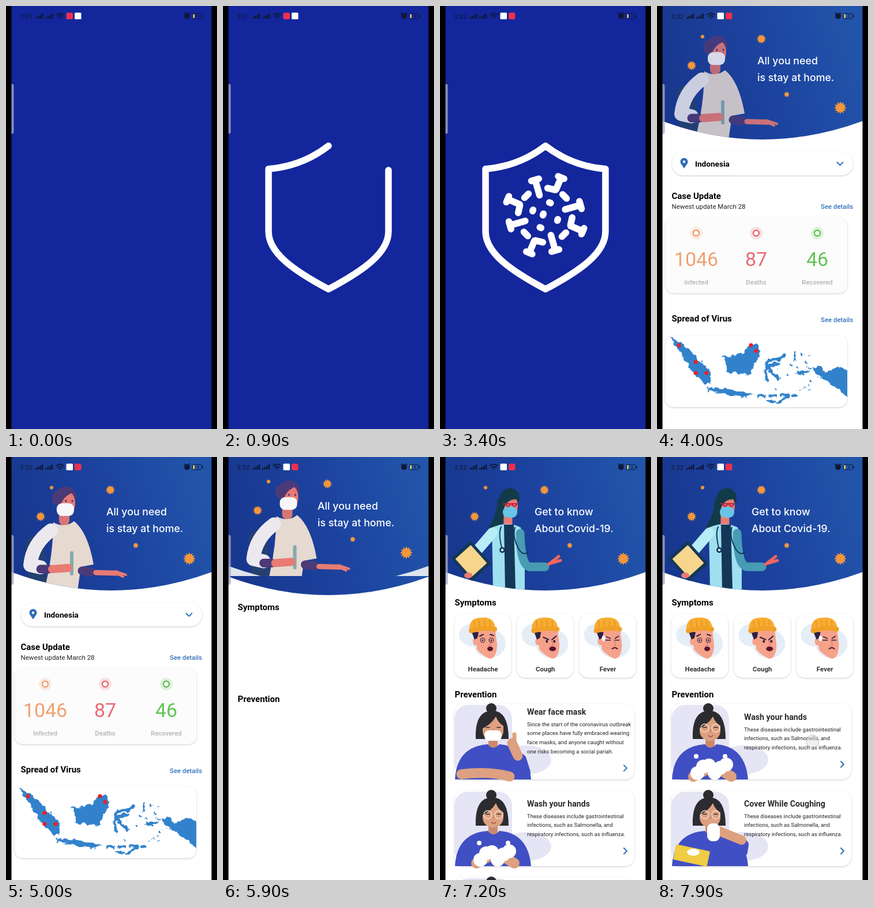
An HTML page for the animation above (8000 ms loop, 366 by 732 pixels).

```html
<!DOCTYPE html>
<html lang="en">
<head>
<meta charset="utf-8">
<title>Stay at home app</title>
<style>
html, body { margin: 0; width: 100%; height: 100%; overflow: hidden; background: #000; }
svg { display: block; width: 366px; height: 732px; font-family: Roboto, sans-serif; }
.round { fill: none; stroke-linecap: round; stroke-linejoin: round; }
.shadow { filter: drop-shadow(0 1px 1.5px #0003); }
</style>
</head>
<body>
<svg id="stage" viewBox="0 0 366 732" xmlns="http://www.w3.org/2000/svg"></svg>
<script>
const LOOP = 8000;
const clamp = v => Math.max(0, Math.min(1, v));
const ramp = (t, start, length) => clamp((t - start) / length);
const easeOut = p => 1 - (1 - p) ** 3;
const easeInOut = p => p * p * (3 - 2 * p);
const times = (n, make) => Array.from({ length: n }, (_, i) => make(i));
const repeat = (n, make) => times(n, make).join('');
let seed = 7;
const random = () => (seed = seed * 16807 % 2147483647) / 2147483647;

// Markup helpers
const text = (x, y, s, size, weight = 400, fill = '#111', more = '') =>
  `<text x="${x}" y="${y + size * .35}" font-size="${size}" font-weight="${weight}" fill="${fill}" ${more}>${s}</text>`;
const mid = 'text-anchor="middle"';
const shape = (d, fill, more = '') => `<path d="${d}" fill="${fill}" ${more}/>`;
const line = (d, color, width, more = '') =>
  `<path class="round" d="${d}" stroke="${color}" stroke-width="${width}" ${more}/>`;
const oval = (x, y, rx, ry, fill, more = '') =>
  `<ellipse cx="${x}" cy="${y}" rx="${rx}" ry="${ry}" fill="${fill}" ${more}/>`;
const box = (x, y, w, h, r, fill, more = '') =>
  `<rect x="${x}" y="${y}" width="${w}" height="${h}" rx="${r}" fill="${fill}" ${more}/>`;
const group = (id, inner, more = '') => `<g id="${id}" ${more}>${inner}</g>`;
const card = (x, y, w, h, r, fill = '#fff') => box(x, y, w, h, r, fill, 'class="shadow"');
const chevron = (x, y) => line(`M${x} ${y - 5}l5 5l-5 5`, '#316cb5', 2);

// Splash: a shield, and a virus with fourfold symmetry
const polar = (r, degrees) => {
  const a = degrees * Math.PI / 180;
  return [182.5 + r * Math.cos(a), 362 + r * Math.sin(a)];
};
const stroke = (r1, a1, r2, a2, start) => ({ from: polar(r1, a1), to: polar(r2, a2), start });
const arc = (r, a, half, start) => stroke(r, a + half, r, a - half, start);
const strokes = [arc(4, 200, 20, 1320)].concat(...times(4, i => {
  const turn = -90 * i, wave = easeOut(i / 3);
  const long = 1000 + 650 * wave, short = 1030 + 880 * wave;
  return [
    arc(47, 193 + turn, 8, 1050 + 50 * i), arc(47, 226 + turn, 6, 1050 + 50 * i),
    arc(23, 201 + turn, 3, 1320 + 40 * i),
    stroke(36, 164 + turn, 63, 164 + turn, long), arc(64, 164 + turn, 6, long + 40),
    stroke(48, 203 + turn, 70, 203 + turn, short), arc(71, 203 + turn, 4.5, short + 40)
  ];
}));
const shield = 'M183 242Q138 277 79 282V390C79 427 121 457 183 490C245 457 287 427 287 390V282Q228 277 183 242Z';
const splash = line(shield, '#fff', 11.5, 'id="shield" pathLength="100" stroke-dasharray="100"') +
  strokes.map(() => line('', '#fff', 11.5, 'data-part')).join('');

// Header
const curve = 'M9 0V199Q183 263 357 199V0Z';
const germ = ([x, y, r]) => `<polygon fill="#f3973d" points="${times(24, i => {
  const a = i * Math.PI / 12, q = i % 2 ? r * .72 : r * 1.1;
  return `${x + q * Math.cos(a)},${y + q * Math.sin(a)}`;
}).join(' ')}"/>`;
const germs = [[181, 57, 7.5], [79, 53, 3.5], [60, 103, 7.5], [225, 153, 4.5], [318, 176, 10]].map(germ).join('');
const slogan = (x, a, b) => `<g font-family="Inter, sans-serif">${
  text(x, 95, a, 17.8, 500, '#fff') + text(x, 124, b, 17.8, 500, '#fff')}</g>`;

const plum = '#4c3a78', coral = '#e87b72', teal = '#113b48', navy = '#143758';
const patient =
  line('M50 154L56 220', '#24406f', 32) +
  oval(88, 71, 8, 12, plum) + oval(104, 69, 18, 18, plum) +
  line('M101 92V110', '#d87573', 18) + oval(107, 80, 13, 20, coral) +
  shape('M88 78Q90 50 121 61Q103 63 95 82Z', plum) +
  oval(104, 76, 1.5, 2, plum) + oval(115, 76, 1.5, 2, plum) + box(88, 80, 30, 22, 9, '#f7f6f8') +
  shape('M82 113Q102 124 118 111Q142 130 152 186L130 190L124 232H66Q82 170 82 113Z', '#e5d9d0') +
  line('M78 127Q46 150 42 187L60 191', '#ece9ee', 24) +
  line('M60 194H74M132 197L148 199', plum, 15) + line('M114 166V202', '#85aaad', 6) +
  line('M80 194L108 192', coral, 14) + line('M156 200L192 201', coral, 9) + line('M190 198L208 204M190 201L203 207', coral, 4);

const doctor =
  oval(121, 71, 17, 17, teal) + line('M108 78Q108 100 94 122', teal, 17) +
  line('M118 98V120', coral, 15) + oval(123, 85, 12, 19, coral) +
  shape('M106 82Q106 56 137 66V74Q118 70 110 90Z', teal) + box(109, 86, 25, 19, 9, '#69c5e6') +
  line('M110 81H134M114 82q4 7 8 0M125 82q4 7 8 0', '#b42141', 1.8) +
  shape('M90 122Q118 110 140 122L147 150V230H92Z', '#9fe0f0') + shape('M111 117H128L131 230H113Z', navy) +
  line('M91 131L46 183', '#b6edf7', 18) + line('M139 132Q140 188 156 190H182', '#479bb4', 15) +
  line('M188 186L206 172M192 184L209 179', '#ef665f', 5) +
  `<g transform="rotate(-42 54 180)">${box(31, 153, 46, 54, 2, navy) + box(36, 159, 36, 42, 1, '#f7d58c')}</g>` +
  oval(49, 205, 7, 5, coral) +
  line('M106 121Q101 132 107 157M130 122Q125 139 137 160Q145 172 153 164', navy, 2) +
  oval(108, 161, 5, 5, navy) + oval(108, 161, 2.3, 2.3, '#c8f0f4');
const person = (id, art) => `<g clip-path="url(#sweep)">${group(id, art)}</g>`;

// Home page
const stat = (x, n, label, color) =>
  oval(x, 393, 11, 11, color, 'opacity=".18"') +
  oval(x, 393, 5, 5, '#fff', `stroke="${color}" stroke-width="2.4"`) +
  text(x, 438, n, 34, 400, color, mid) + text(x, 478, label, 11.3, 500, '#b2b2b2', mid);
const sea = '#3282cb';
const islands = [
  'M22 573L42 582L70 609L93 633V654H82L60 630L38 596Z',
  'M114 604L124 608L150 600L160 586H174L180 603L169 618L161 638L122 634Z',
  'M270 627L285 623L292 635L312 625L331 631V678L308 658L282 643Z',
  'M87 660L125 663L169 672L150 677L92 667Z'
].map(d => shape(d, sea)).join('') +
  line('M221 604Q216 613 194 612Q184 625 191 650M192 624L210 619M194 628L211 645', sea, 5.5) +
  line('M208 687L228 675M192 682L203 686M240 599V613M246 634H260', sea, 4) +
  `<path d="M173 674H242" stroke="${sea}" stroke-width="5" stroke-dasharray="15 5"/>` +
  repeat(22, () => oval(205 + random() * 65, 600 + random() * 70, 1 + random() * 2, 1 + random(), sea));
const hotspots = [[38, 587], [67, 616], [67, 635], [86, 635], [163, 587], [172, 597]]
  .map(([x, y]) => oval(x, y, 3.6, 3.6, '#e81f2d')).join('');
const link = y => text(284, y, 'See details', 11.4, 500, '#3372ba');
const title = (y, s) => text(25.5, y, s, 15, 700, '#000');
const home = box(9, 0, 348, 732, 0, '#fff') + card(26, 253, 314, 40, 20) +
  shape('M47 281L41 272A6.500 6.500 0 1 1 53 272Z', '#2c6cbb') + oval(47, 269.5, 2.2, 2.2, '#fff') +
  text(66, 273, 'Indonesia', 13.6, 700, '#000') + line('M312.500 270.500l5 5l5-5', '#2c6cbb', 1.8) +
  title(329, 'Case Update') + text(25.5, 347, 'Newest update March 28', 11.5, 400, '#222') + link(347) +
  card(15, 366, 315, 131, 14, '#fcfcfc') +
  stat(68, '1046', 'Infected', '#f0a06f') + stat(172, '87', 'Deaths', '#e96971') + stat(278, '46', 'Recovered', '#60c454') +
  title(541, 'Spread of Virus') + link(543) + card(15, 570, 315, 124, 14) +
  `<g clip-path="url(#mapClip)"><g filter="url(#coast)">${islands}</g></g>` + hotspots;

// Symptom cards
const ink = '#2d2144', maroon = '#54152d';
const ring = x => `<circle cx="${x}" cy="317" r="4" fill="none" stroke="${ink}"/>` + oval(x, 317, 1.5, 1.5, ink);
const faces = [
  ring(74) + ring(89) + line('M69 310l6-3M87 307l6 2', ink, 2) + oval(87, 332, 5, 4, maroon),
  line('M71 312l9 4M93 310l-7 6', ink, 2.2) + oval(77, 319, 2, 2.5, ink) + oval(90, 319, 2, 2.5, ink) + oval(87, 332, 6, 4, maroon),
  line('M71 317h8M87 317h7M72 311l7 3M93 310l-6 4', ink, 1.6) + line('M82 332q5-4 9 0', maroon, 2) + oval(67, 314, 3, 5, '#eef7ff')
];
const symptom = (name, i) => `<g transform="translate(${i * 108.3} 0)">` + card(25, 272, 98.5, 110, 15) +
  oval(58, 308, 25, 20, '#e5edf7') + oval(86, 323, 28, 25, '#e5edf7') +
  shape('M62 300H96L99 325Q98 349 86 349Q72 343 64 333Z', '#f6a28b') + oval(62, 319, 5, 7, '#f6a28b') +
  line('M85 316l3 10l-4 1', '#e17d74', 1.5) + shape('M55 303H67L65 313L60 316Z', ink) +
  shape('M51 301Q49 279 70 278Q94 275 96 296Z', '#f8ac31') +
  repeat(4, n => line(`M${60 + n * 9} 294l-1-11`, '#dc8a1c', 1.2)) +
  line('M54 301Q74 294 95 298', '#f0a127', 8) + faces[i] +
  text(74.5, 367, name, 11.5, 700, '#333', mid) + '</g>';

// Prevention list
const skin = '#dda080', blue = '#414fc4', hair = '#2c2b30', lilac = '#e5e5f5';
const girl =
  box(0, 2, 100, 125, 24, lilac) + oval(125, 97, 43, 25, lilac) + oval(64, 8, 9, 9, hair) +
  shape('M37 61Q35 12 66 12Q94 12 94 61Z', hair) + line('M67 60V71', '#ca8a6d', 16) + box(49, 20, 36, 44, 17, skin) +
  shape('M46 44Q46 14 66 14Q88 14 88 40Q76 34 72 22Q64 36 46 44Z', hair) +
  shape('M1 131Q4 74 58 70Q67 82 78 70Q128 74 133 131Z', blue) +
  line('M55 41h6M74 41h6', hair, 1.6) + line('M68 44v5', '#b97057', 1.2);
const specs = [58, 77].map(x => `<circle cx="${x}" cy="42" r="7" fill="none" stroke="#f3ddd0" stroke-width="1.300"/>`).join('');
const foam = repeat(6, i => oval(45 + i * 10, 112 + 8 * Math.cos(i * 2), 12, 12, '#fff'));
const poses = [
  box(52, 46, 30, 18, 8, '#fff') + line('M12 122Q60 116 96 126', skin, 17) + line('M121 119L114 97', blue, 22) +
    line('M110 90L100 68', skin, 17) + line('M104 62V53', skin, 7),
  specs + line('M64 55q4 4 8 0', '#a94a4a', 1.4) + line('M38 126L60 114M104 126L84 114', skin, 18) + foam +
    oval(43, 91, 4, 4, '#fff') + oval(93, 91, 4, 4, '#fff'),
  specs + line('M122 106L124 94', blue, 20) + line('M122 86L82 70', skin, 16) + box(62, 57, 22, 31, 9, '#fff') +
    box(5, 99, 60, 27, 2, '#f0cc42', 'transform="rotate(12 35 112)"') + oval(38, 107, 11, 6, '#fff')
];
const common = ['These diseases include gastrointestinal', 'infections, such as Salmonella, and', 'respiratory infections, such as influenza.'];
const tips = [
  ['Wear face mask', ['Since the start of the coronavirus outbreak', 'some places have fully embraced wearing',
    'face masks, and anyone caught without', 'one risks becoming a social pariah.']],
  ['Wash your hands', common],
  ['Cover While Coughing', common]
];
const tip = ([name, body], i) => {
  const top = 50 - body.length * 9;
  return `<g transform="translate(25 ${427 + i * 150})">` + card(0, 0, 312, 131, 16, '#f1f1f1') +
    '<g class="fade">' + box(0, 0, 312, 131, 16, '#fff') + girl + poses[i] +
    text(126, top, name, 14.2, 700, '#2b2b2b') +
    body.map((s, n) => text(126, top + 21.5 + n * 15.6, s, 9.55, 400, '#222')).join('') +
    chevron(294, top + 35 + body.length * 15.6) + '</g></g>';
};
const details = box(9, 0, 348, 732, 0, '#fff') + shape(curve, 'url(#sky)') +
  group('info', germs + person('doctor', doctor) + slogan(164, 'Get to know', 'About Covid-19.')) +
  title(252, 'Symptoms') + group('symptoms', ['Headache', 'Cough', 'Fever'].map(symptom).join('')) +
  title(411, 'Prevention') +
  `<g clip-path="url(#listClip)">${group('list', tips.map(tip).join(''))}</g>`;

// Status bar
const dark = '#0f1838';
const signal = x => repeat(4, i => box(x + i * 3.6, 19 - i * 2, 2.5, 3 + i * 2, .5, dark));
const status = text(24, 17.5, '3:31', 11.5, 400, dark, 'id="clock"') + signal(51) + signal(68) +
  line('M87 15q6.500-5 13 0M89.500 18q4-3 8 0', dark, 1.8) + oval(93.5, 20.5, 1.5, 1.5, dark) +
  oval(314, 17.5, 5, 5, dark) + line('M309 13l2-1M319 13l-2-1', dark, 1.6) +
  box(323.5, 13, 16, 9, 2.5, 'none', `stroke="${dark}"`) + box(340.5, 15.5, 1.5, 4, .5, dark) +
  text(333, 17.5, '3', 7, 400, dark, mid) + box(324.5, 14, 2.5, 7, 1, '#f3d34d') +
  box(0, 11.5, 11.5, 11.5, 2.5, '#ec304f', 'id="red"') + box(0, 11.5, 11.5, 11.5, 1.5, '#fff', 'id="white"');

const stage = document.getElementById('stage');
stage.innerHTML = `<defs>
  <linearGradient id="sky" gradientUnits="userSpaceOnUse" x1="20" y1="160" x2="350" y2="60">
    <stop stop-color="#18378f"/><stop offset=".5" stop-color="#1c439f"/><stop offset="1" stop-color="#2255aa"/>
  </linearGradient>
  <filter id="coast" color-interpolation-filters="sRGB">
    <feTurbulence type="fractalNoise" baseFrequency=".13" numOctaves="2" seed="4"/>
    <feDisplacementMap in="SourceGraphic" scale="9" xChannelSelector="R" yChannelSelector="G"/>
  </filter>
  <clipPath id="sweep"><path d="${curve}"/></clipPath>
  <clipPath id="mapClip"><rect x="15" y="570" width="315" height="124" rx="14"/></clipPath>
  <clipPath id="listClip"><rect x="9" y="425" width="348" height="320"/></clipPath>
  <clipPath id="heroClip"><rect id="heroBox" x="9" width="348" height="240"/></clipPath></defs>` +
  box(9, 0, 348, 732, 0, '#13269c') + group('splash', splash) + group('home', home) + group('details', details) +
  group('hero', box(9, 0, 348, 240, 0, '#e9edf2', 'id="heroBack"') +
    group('heroArt', shape(curve, 'url(#sky)') + germs + person('patient', patient) +
      group('slogan', slogan(174, 'All you need', 'is stay at home.'))), 'clip-path="url(#heroClip)"') +
  status + box(5, 135, 8.5, 86, 3, '#a0a8ca', 'opacity=".8"') +
  oval(0, 0, 11, 11, '#ddd', 'id="touch" fill-opacity=".45" stroke="#999" stroke-opacity=".5"') +
  box(0, 0, 9.5, 732, 0, '#000') + box(356.5, 0, 9.5, 732, 0, '#000');

const el = id => document.getElementById(id);
const set = (id, name, value) => el(id).setAttribute(name, value);
const move = (id, x, y) => set(id, 'transform', `translate(${x} ${y})`);
const fade = (id, value) => {
  set(id, 'opacity', value);
  set(id, 'visibility', value > 0 ? 'visible' : 'hidden');
};
const parts = [...document.querySelectorAll('[data-part]')];
const fades = [...document.querySelectorAll('.fade')];

function render(t) {
  const late = t >= 950;
  el('clock').textContent = late ? '3:32' : '3:31';
  set('red', 'x', late ? 119 : 104.5);
  set('white', 'x', late ? 104.5 : 119);

  const drawn = easeInOut(ramp(t, 300, 800));
  set('shield', 'stroke-dashoffset', 100 * (1 - drawn));
  set('shield', 'visibility', drawn ? 'visible' : 'hidden');
  parts.forEach((part, i) => {
    const { from: [x1, y1], to: [x2, y2], start } = strokes[i];
    const k = ramp(t, start, 380);
    part.setAttribute('d', `M${x1} ${y1}L${x1 + (x2 - x1) * k} ${y1 + (y2 - y1) * k}`);
    part.setAttribute('opacity', k);
  });

  // Home fades in, then its header flies into the details page
  const shown = ramp(t, 3480, 350), flight = ramp(t, 5700, 310), e = easeOut(flight);
  fade('home', shown);
  fade('hero', flight < 1 ? shown : 0);
  set('patient', 'opacity', ramp(t, 3500, 590));
  move('heroArt', 0, -11 * e);
  move('patient', 11 * e, 0);
  move('slogan', -10.5 * e, 0);
  set('heroBox', 'height', 240 - 35.5 * e);
  set('heroBack', 'opacity', e);

  fade('details', ramp(t, 5700, 160));
  move('details', 0, 183 * (1 - e));
  fade('info', ramp(t, 5980, 260));
  fade('symptoms', ramp(t, 6050, 380));
  const k = ramp(t, 6200, 440), scroll = 150 * easeInOut(ramp(t, 7280, 580));
  fade('list', clamp(k * 3));
  fades.forEach(node => node.setAttribute('opacity', k));
  move('list', 0, 16 * (1 - k) - scroll);

  const dragging = t > 7250, tapping = t > 5400 && t < 5600;
  move('touch', dragging ? 270 : 312, dragging ? 642 - scroll : 347);
  fade('touch', dragging || tapping ? 1 : 0);
}

const origin = performance.now();
function tick() {
  render((performance.now() - origin) % LOOP);
  requestAnimationFrame(tick);
}
tick();
</script>
</body>
</html>
```
